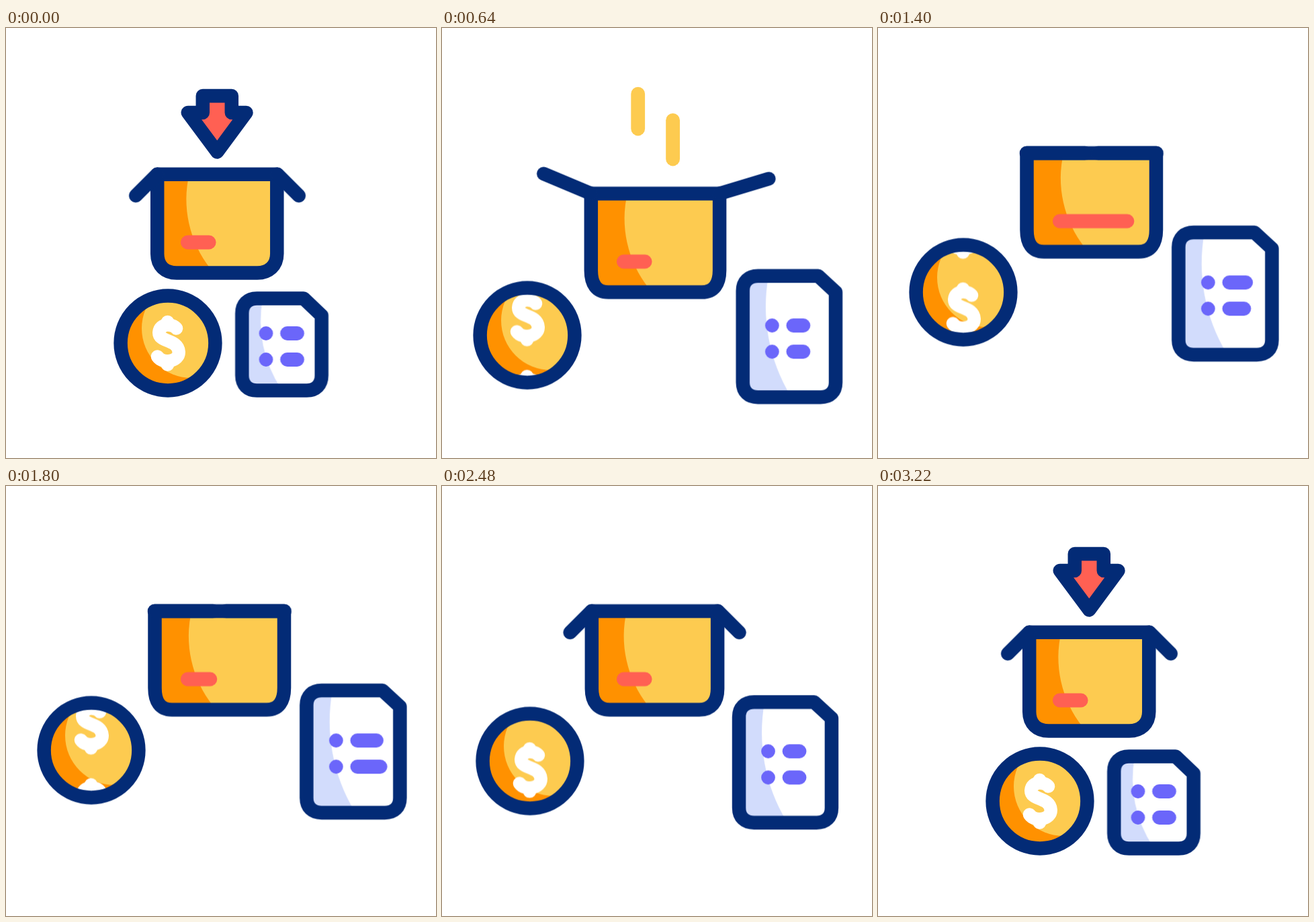
An HTML page without scripts for the animation above (3360 ms loop, 640 by 640 pixels).

```html
<!DOCTYPE html>
<html lang="en">
<head>
<meta charset="utf-8">
<title>Packing a box</title>
<style>
html, body { margin: 0; width: 100%; height: 100%; overflow: hidden; background: #fff; }
svg { display: block; width: 100vw; height: 100vh; }
svg * {
  animation-duration: 3360ms;
  animation-iteration-count: infinite;
  animation-timing-function: cubic-bezier(.333, 0, .667, 1);
}
.line { fill: none; stroke: #032b76; stroke-width: 20.5; stroke-linecap: round; stroke-linejoin: round; }
.bar { fill: none; stroke-width: 20.8; stroke-linecap: round; }
.red { stroke: #ff6053; }
.violet { stroke: #6b66fa; }
.gold { stroke: #fdcb50; }
.yellow { fill: #fdcb50; }
.orange { fill: #ff9100; }
.tint { fill: #d2dcfc; }

/* dip on impact, spring up, settle back */
.scene { animation-name: scene; }
@keyframes scene {
  0%, 13.1%, 87.5%, 100% { transform: none; }
  19.5% { transform: translateY(29px); animation-timing-function: cubic-bezier(.3, 0, .3, 1); }
  34.52%, 76.79% { transform: translateY(-31.5px); }
}

.arrow { fill: #ff6053; animation-name: arrow; }
@keyframes arrow {
  0%, 4.46%, 89.29%, 100% { transform: none; }
  9.82% { transform: translateY(-57px); animation-timing-function: ease-in; }
  16.07%, 20.83% { transform: translateY(165px); }
  20.84%, 75.6% { transform: translateY(-197px); }
}

/* streaks shrink towards their lower end */
.trail { animation-name: trail; animation-timing-function: linear; visibility: hidden; }
.trail.late { animation-delay: -3340ms; }
@keyframes trail {
  0%, 14.88% { stroke-dasharray: 0px 200px; visibility: hidden; }
  14.89% { stroke-dasharray: 0px 200px; visibility: visible; }
  17.26% { stroke-dasharray: 70px 200px; }
  19.05% { stroke-dasharray: 52px 200px; transform: none; }
  30.65% { stroke-dasharray: .1px 200px; transform: translateY(var(--drift, 0)); visibility: visible; }
  30.66%, 100% { visibility: hidden; }
}

/* parts that follow the box as it widens */
.spread { animation-name: spread; }
@keyframes spread {
  0%, 13.1%, 80.36%, 100% { translate: 0 0; }
  20.4%, 69.35% { translate: var(--x, 0) var(--y, 0); }
}
.box { animation-name: box; }
@keyframes box {
  0%, 13.1%, 80.36%, 100% { d: path("M225.2 217.7H403.3V336C403.3 354 391 364.5 374 364.5H254C237 364.5 225.2 354 225.2 336Z"); }
  20.4%, 69.35% { d: path("M221.5 217.7H414V332C414 352 406 364.5 388 364.5H247C229 364.5 221.5 352 221.5 332Z"); }
}
.label { animation-name: label; }
@keyframes label {
  0%, 30.95%, 54.76%, 100% { d: path("M270.3 319H302.2"); }
  42.26% { d: path("M270.3 319H371.5"); }
}

.flap { animation-name: flap; }
@keyframes flap {
  0%, 13.99%, 73.21%, 100% { transform: rotate(-135deg); d: path("M0 0V-45"); }
  13.99%, 54.17% { animation-timing-function: ease-in; }
  19.05% { transform: rotate(var(--closing)); d: path("M0 0V-76"); animation-timing-function: ease-out; }
  28.57%, 54.17% { transform: rotate(90deg); d: path("M0 0V-87"); }
  63.69% { transform: rotate(var(--opening)); d: path("M0 0V-49"); animation-timing-function: ease-out; }
}

/* coin and page move apart; the page runs slightly ahead */
.part { animation-name: part; }
.page, .sheet, .tint { animation-delay: -16ms; }
@keyframes part {
  0%, 13.1%, 87.2%, 100% { transform: none; }
  19.05%, 72.17% { transform: translateX(var(--shift)); }
}

.reel { animation-name: reel; }
@keyframes reel {
  0% { transform: translateY(0); }
  13.99% { transform: translateY(0); animation-timing-function: cubic-bezier(.333, 0, .667, .333); }
  19.05% { transform: translateY(-25px); animation-timing-function: cubic-bezier(.15, .355, .55, .86); }
  80.36%, 100% { transform: translateY(-354px); }
}

.sheet { animation-name: sheet; }
@keyframes sheet {
  0%, 13.1%, 87.2%, 100% { d: path("M-37 -68.5H32.5L59.2 -43V46C59.2 60 51 68.5 37 68.5H-37C-51 68.5 -59.2 60 -59.2 46V-46C-59.2 -60 -51 -68.5 -37 -68.5Z"); }
  20.4%, 72.17% { d: path("M-47 -91H43.5L69.5 -67V69C69.5 83 61 91 47 91H-47C-61 91 -69.5 83 -69.5 69V-69C-69.5 -83 -61 -91 -47 -91Z"); }
}
.tint { animation-name: tint; }
@keyframes tint {
  0%, 13.1%, 87.2%, 100% { d: path("M-59 -46Q-59 -68 -37 -68H-28.5A183 183 0 0 0 -1 66H-37Q-59 66 -59 46Z"); }
  20.4%, 72.17% { d: path("M-69 -69Q-69 -91 -47 -91H-31A260 260 0 0 0 2 89H-47Q-69 89 -69 69Z"); }
}
.row { animation-name: row; }
.row.late { animation-delay: -3310ms; }
@keyframes row {
  0%, 23.81%, 48.13%, 61.9%, 100% { d: path("M0 0H15"); }
  31.55%, 54.76% { d: path("M0 0H36"); }
}
</style>
</head>
<body>
<svg viewBox="0 0 640 640">
  <defs>
    <clipPath id="disc"><circle r="66"/></clipPath>
    <g id="dollar" fill="none" stroke="#fff" stroke-width="19.5" stroke-linecap="round" stroke-linejoin="round">
      <path d="M12.5 -22C7 -29 -12 -30 -13.2 -16C-14 -1 15 -6 16.2 13C17 27 -7 32 -15.5 20"/>
      <path d="M-.5 -31.5V-28M-.5 32V28"/>
    </g>
  </defs>

  <path class="bar gold trail" style="--drift: -8.5px" d="M291.7 150V50"/>
  <path class="bar gold trail late" d="M343.6 195V95"/>
  <path class="line arrow" style="fill: #ff6053" d="M292.8 101H335.8V126H357.5L314.3 184.5L270.8 126H292.8Z"/>

  <g class="scene">
    <path class="yellow box"/>
    <path class="orange spread" style="--x: 3.5px" d="M225 217H272.8A167 167 0 0 0 304 358V360H256Q225 360 225 330Z"/>
    <path class="bar red label"/>
    <path class="line box"/>
    <g class="spread" style="--x: -4px">
      <g transform="translate(225 217.7)">
        <path class="line flap" style="--closing: -68deg; --opening: -27deg"/>
      </g>
    </g>
    <g class="spread" style="--x: 10.5px">
      <g transform="translate(404 217.7) scale(-1 1)">
        <path class="line flap" style="--closing: -74deg; --opening: -37deg"/>
      </g>
    </g>

    <g class="spread" style="--y: -44.2px">
      <g class="part" style="--shift: -114px">
        <g transform="translate(241 469)">
          <g clip-path="url(#disc)">
            <circle class="orange" r="70"/>
            <circle class="yellow" cx="35" cy="-22" r="74"/>
            <g class="reel">
              <use href="#dollar"/>
              <use href="#dollar" y="118"/>
              <use href="#dollar" y="236"/>
              <use href="#dollar" y="354"/>
            </g>
          </g>
          <circle class="line" r="70.4"/>
        </g>
      </g>

      <g class="part page" style="--shift: 106.3px">
        <g transform="translate(410.5 471)">
          <path class="sheet" fill="#fff"/>
          <path class="tint"/>
          <g class="part" style="--shift: -2px">
            <path class="bar violet" d="M-23.5 -16.5h.01M-23.5 22.5h.01"/>
            <g transform="translate(8 -16.5)"><path class="bar violet row late"/></g>
            <g transform="translate(8 22.5)"><path class="bar violet row"/></g>
          </g>
          <path class="line sheet"/>
        </g>
      </g>
    </g>
  </g>
</svg>
</body>
</html>
```
